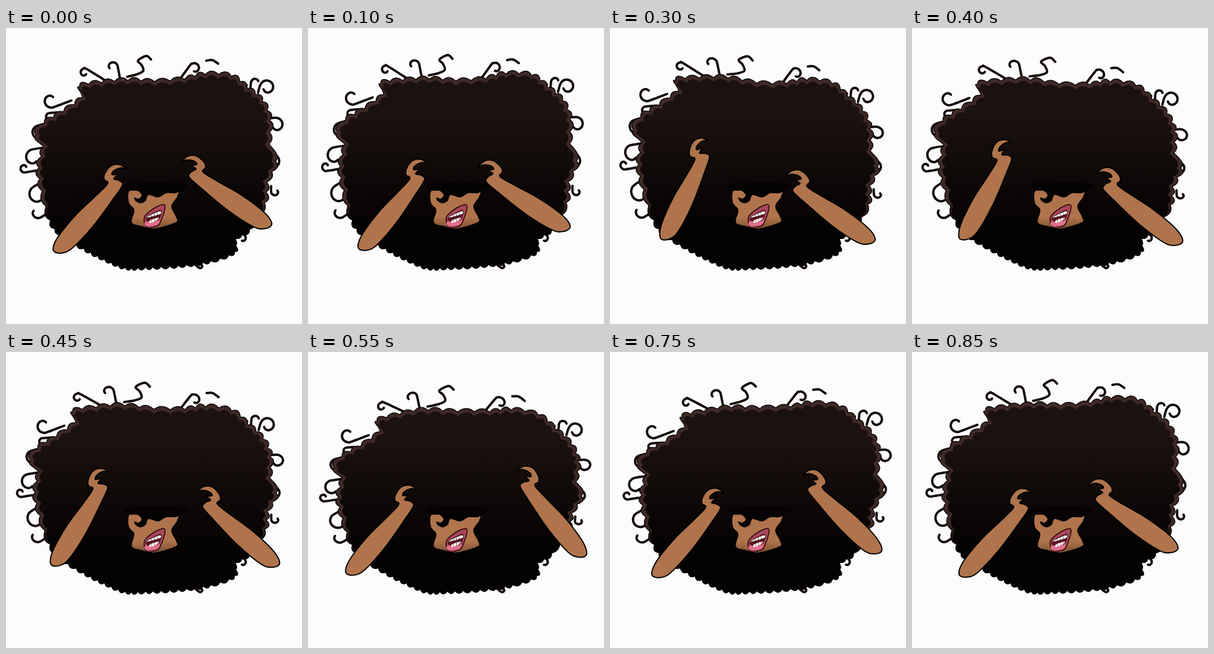
Recreate the animation shown at these times as an HTML page with a canvas. Size 498x498 px, loop 0.9 s.

```html
<!DOCTYPE html>
<html lang="en">
<head>
<meta charset="utf-8">
<title>Curls</title>
<style>
html, body { margin: 0; width: 100%; height: 100%; overflow: hidden; background: #fcfcfc; }
canvas { display: block; }
</style>
</head>
<body>
<canvas id="stage" width="498" height="498"></canvas>
<script>
const ctx = document.getElementById('stage').getContext('2d');
const LOOP = 900, STEP = 50, PERIOD = 856;
const SKIN = '#b0744c', INK = '#0a0505', BROWN = '#3f2926';

// time | left arm: lift in degrees, elbow | right arm: same | pull on left hair | pull on right hair
const POSES = [
  [0, 47.6, 80, 375, 33.9, 447, 331, 0, 0, 0, 0],
  [200, 55.5, 87, 364, 33.9, 440, 345, -6, -8, -5, 5],
  [300, 63.4, 86, 355, 34.6, 446, 357, -14, -11, -7, 16],
  [450, 57.6, 76, 358, 40.5, 460, 357, -12, 2, 1, 23],
  [550, 48.9, 64, 372, 50.1, 468, 342, -8, 18, 11, 32],
  [750, 48.3, 71, 376, 43.2, 457, 335, -3, 11, 8, 14]
];

// Clockwise from the lower left
const HAIR = pairs([72,325, 58,275, 52,235, 60,200, 47,180, 62,158, 95,138, 126,115, 122,96, 160,89,
  205,85, 250,87, 300,83, 335,75, 380,78, 408,99, 434,122, 447,155, 446,195, 457,225, 442,260,
  438,295, 412,340, 388,356, 386,378, 345,394, 290,402, 235,405, 200,405, 165,391, 130,373, 92,350]);

// Loose curls: root, centre, radius, turn
const CURLS = [
  [170,90, 132,75, 7, -4.5], [192,86, 179,66, 9, -3.3], [292,87, 317,68, 9, 4.2],
  [405,96, 390,91, 7, 2], [411,104, 421,93, 9, 2.2], [424,109, 439,100, 12, 5.5],
  [110,122, 76,122, 12, 4], [86,142, 74,152, 9, -1.6], [70,160, 56,176, 12, -4],
  [66,201, 47,218, 14, -3.5], [50,240, 31,236, 7, 4.2], [66,256, 54,280, 15, -4],
  [76,308, 53,308, 12, 2.2], [442,152, 454,163, 12, 4], [444,203, 447,225, 13, 3],
  [446,266, 453,275, 7, -3.5], [385,345, 397,354, 7, 3], [318,398, 327,400, 4, -3]
];
const STRANDS = [
  [244,53, 236,47, 222,55, 228,62, 231,72, 220,78, 204,82],
  [337,55, 347,54, 357,60]
].map(pairs);

// Elbow at the origin, wrist along x, fingers curling towards the face
const ARM = pairs([0,0, 12,-8, 36,-12, 74,-13, 115,-10, 145,-9, 146,-18, 154,-24, 171,-25, 182,-16,
  184,-3, 179,-11, 168,-16, 161,-14, 167,-7, 158,-7, 162,2, 160,11, 134,15, 75,21, 24,20, 6,12]);

function pairs(list) {
  return Array.from({ length: list.length / 2 }, (_, i) => [list[2 * i], list[2 * i + 1]]);
}

const clamp = v => Math.max(0, Math.min(1, v));

// Smooth closed motion through the poses; uneven gaps weigh the tangents
function poseAt(t) {
  const n = POSES.length;
  const pose = i => {
    const lap = Math.floor(i / n), [time, ...rest] = POSES[i - lap * n];
    return [time + lap * PERIOD, ...rest];
  };
  let i = n - 1;
  while (POSES[i][0] > t) i--;
  const [a, b, c, d] = [-1, 0, 1, 2].map(k => pose(i + k));
  const tangent = (p, q, r, j) => {
    const before = q[0] - p[0], after = r[0] - q[0];
    return ((q[j] - p[j]) / before * after + (r[j] - q[j]) / after * before) / (before + after);
  };
  const span = c[0] - b[0], u = (t - b[0]) / span;
  return b.map((from, j) => {
    const rise = c[j] - from, m0 = tangent(a, b, c, j) * span, m1 = tangent(b, c, d, j) * span;
    return from + u * m0 + u * u * (3 * rise - 2 * m0 - m1) + u ** 3 * (m0 + m1 - 2 * rise);
  }).slice(1);
}

function trace(pts, closed) {
  const n = pts.length;
  const at = i => closed ? pts[(i + n) % n] : pts[Math.max(0, Math.min(n - 1, i))];
  ctx.beginPath();
  ctx.moveTo(...pts[0]);
  for (let i = 0; i < (closed ? n : n - 1); i++) {
    const [a, b, c, d] = [at(i - 1), at(i), at(i + 1), at(i + 2)];
    ctx.bezierCurveTo(b[0] + (c[0] - a[0]) / 6, b[1] + (c[1] - a[1]) / 6,
      c[0] - (d[0] - b[0]) / 6, c[1] - (d[1] - b[1]) / 6, c[0], c[1]);
  }
  if (closed) ctx.closePath();
}

function line(pts, color, width, closed = false) {
  trace(pts, closed);
  ctx.strokeStyle = color;
  ctx.lineWidth = width;
  ctx.stroke();
}

function blob(pts, fill, stroke, width) {
  trace(pts, true);
  ctx.fillStyle = fill;
  ctx.fill();
  if (stroke) line(pts, stroke, width, true);
}

function fade(y0, y1, from, to) {
  const g = ctx.createLinearGradient(0, y0, 0, y1);
  g.addColorStop(0, from);
  g.addColorStop(1, to);
  return g;
}

// Scalloped outline: long waves above, short bumps below
function hairEdge(inset) {
  const n = HAIR.length, out = [];
  HAIR.forEach((b, i) => {
    const a = HAIR[(i + n - 1) % n], c = HAIR[(i + 1) % n], d = HAIR[(i + 2) % n];
    const low = b[1] > 330;
    const bumps = Math.max(1, Math.round(Math.hypot(c[0] - b[0], c[1] - b[1]) / (low ? 13 : 22)));
    const count = bumps * 5;
    for (let k = 0; k < count; k++) {
      const u = k / count;
      const spline = j => b[j] + u * (c[j] - a[j]) / 2 + u * u * (a[j] - 2.5 * b[j] + 2 * c[j] - d[j] / 2)
        + u ** 3 * (1.5 * (b[j] - c[j]) + (d[j] - a[j]) / 2);
      const x = spline(0), y = spline(1);
      const tx = c[0] - b[0] + (1 - u) * (b[0] - a[0]) + u * (d[0] - c[0]);
      const ty = c[1] - b[1] + (1 - u) * (b[1] - a[1]) + u * (d[1] - c[1]);
      const wave = (low ? 4 : 5) * (Math.abs(Math.sin(Math.PI * bumps * u)) - .6);
      const push = (wave - inset * clamp((340 - y) / 60)) / Math.hypot(tx, ty);
      out.push([x + ty * push, y - tx * push]);
    }
  });
  return out;
}

// Straight stem that runs tangentially into a tightening spiral
function curl([rx, ry, cx, cy, r, turn]) {
  const reach = Math.hypot(rx - cx, ry - cy);
  const start = Math.atan2(ry - cy, rx - cx) + Math.sign(turn) * Math.acos(Math.min(1, r / reach));
  const pts = [[rx, ry]];
  for (let s = 0; s <= 1; s += .125) {
    const radius = r * (1 - .45 * s * s), angle = start + turn * s;
    pts.push([cx + radius * Math.cos(angle), cy + radius * Math.sin(angle)]);
  }
  return pts;
}

const RIM = hairEdge(0), BODY = hairEdge(7);
const LOCKS = [...CURLS.map(curl), ...STRANDS];

function drawArm(side, lift, x, y) {
  ctx.save();
  ctx.translate(x, y);
  ctx.scale(side, 1);
  ctx.rotate(-lift * Math.PI / 180);
  blob(ARM, SKIN, '#000', 2);
  ctx.restore();
}

function drawFace() {
  blob(pairs([208,274, 228,274, 284,274, 288,283, 278,300, 286,318, 285,327, 250,337, 228,333,
    212,327, 216,306, 207,294]), fade(318, 332, SKIN, '#8d5b39'));
  // Fringe over the forehead
  blob(pairs([205,262, 300,262, 288,277, 270,278, 256,285, 240,281, 235,291, 226,295, 218,291, 216,285,
    223,287, 228,281, 221,274, 208,273]), '#040202');
  // Mouth
  blob(pairs([233,318, 248,304, 265,297, 267,306, 258,330, 248,335, 236,335]), '#a9465a', '#200808', 1.5);
  blob(pairs([235,326, 257,322, 255,331, 236,333]), '#e0708a');
  blob(pairs([236,319, 260,306, 257,323, 240,326]), '#5b1520');
  blob(pairs([238,317, 258,308, 260,313, 240,319]), '#fff', '#200808', 1);
  blob(pairs([242,324, 256,319, 255,323, 243,328]), '#fff');
  for (const x of [244, 249, 254]) {
    const drop = (x - 244) / 3;
    line([[x, 314 - drop], [x + 1, 319 - drop]], '#5b1520', .8);
    line([[x + 1, 323 - drop], [x + 1, 327 - drop]], '#5b1520', .7);
  }
}

function draw(t) {
  const [leftLift, lx, ly, rightLift, rx, ry, ldx, ldy, rdx, rdy] = poseAt(t);
  // Each hand drags its half of the hair; the lower edge stays put
  const warp = ([x, y]) => {
    const height = clamp((330 - y) / 190);
    const l = height * clamp((270 - x) / 150), r = height * clamp((x - 190) / 240);
    return [x + l * ldx + r * rdx, y + l * ldy + r * rdy];
  };

  ctx.fillStyle = '#fcfcfc';
  ctx.fillRect(0, 0, 498, 498);
  ctx.lineCap = ctx.lineJoin = 'round';

  for (const lock of LOCKS) line(lock.map(warp), '#140b0a', 4);
  blob(RIM.map(warp), fade(290, 335, BROWN, '#030101'), INK, 1.5);
  blob(BODY.map(warp), fade(150, 340, '#1b1110', '#030101'));
  drawFace();
  drawArm(1, leftLift, lx, ly);
  drawArm(-1, rightLift, rx, ry);
}

function tick() {
  draw(Math.floor(performance.now() % LOOP / STEP) * STEP);
  requestAnimationFrame(tick);
}
tick();
</script>
</body>
</html>
```
